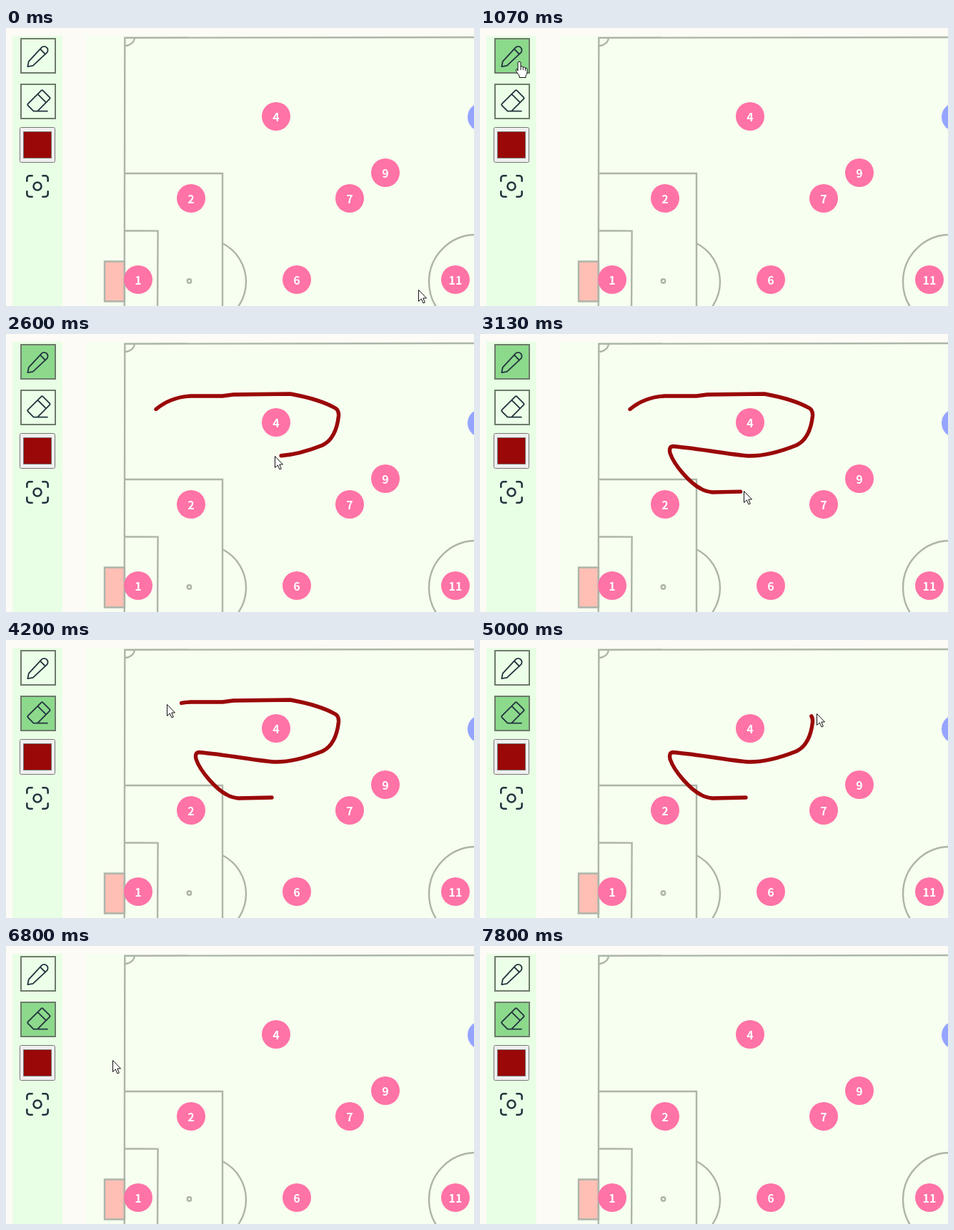
Write an HTML page that moves like this. It is 655 by 390 pixels and loops after 9670 ms.

```html
<!DOCTYPE html>
<html lang="en">
<head>
<meta charset="utf-8">
<title>Tactics board</title>
<style>
html, body { margin: 0; width: 100%; height: 100%; overflow: hidden; background: #fcfbf6; }
svg { display: block; fill: none; }
text { font: 700 16px "Noto Sans CJK JP", "Noto Sans CJK SC", "Noto Sans CJK", "Noto Sans", sans-serif; fill: #fff; text-anchor: middle; }
.lines { stroke: #adb5a9; stroke-width: 2.4; }
.button { stroke: #6c7b6a; stroke-width: 2; }
.icon { stroke: #23343f; stroke-linejoin: round; stroke-linecap: round; }
.cursor { fill: #fff; stroke: #111; stroke-linejoin: round; }
</style>
</head>
<body>
<svg width="655" height="390" viewBox="0 0 655 390">
  <path fill="#e9ffe5" d="M9 11h70v379H9z"/>
  <path fill="#f7fff0" d="M112 11h543v379H112z"/>

  <g class="lines">
    <path fill="#ffbfb5" d="M138 327.5h28v56h-28z"/>
    <path d="M165.7 400L166.3 13.7L660 13M180 13.5A14 12 0 0 1 166 25M166 204H303V400M166 284.3L212.6 284.6L212 400"/>
    <path d="M303 302A60.7 60.7 0 0 1 303 410"/>
    <circle cx="256.5" cy="355" r="2.7"/>
    <circle cx="658" cy="356" r="66"/>
  </g>
  <g id="players"></g>

  <rect id="pencil" class="button" x="21" y="15" width="48" height="48"/>
  <path class="icon" transform="translate(23 17.5) scale(1.833)"
    d="M4 20l.8-4L14.5 5.5a2.83 2.83 0 1 1 4 4L8 19.3zM13.5 6.5l4 4"/>
  <rect id="eraser" class="button" x="21" y="79" width="48" height="48"/>
  <path class="icon" transform="translate(23 80) scale(1.833)"
    d="M19 20H8.5l-4.2-4.3a1 1 0 0 1 0-1.4l10-10a1 1 0 0 1 1.4 0l5 5a1 1 0 0 1 0 1.4L11.5 20M18 13.3L11.7 7"/>
  <rect x="19.5" y="139.5" width="49" height="49" rx="2" fill="#efefef" stroke="#767676"/>
  <path fill="#9a0808" stroke="#777" d="M24.5 145.5h39v37h-39z"/>
  <path class="icon" stroke-width="1.4" transform="translate(22 200) scale(1.833)"
    d="M4 8V6a2 2 0 0 1 2-2h2M4 16v2a2 2 0 0 0 2 2h2M16 4h2a2 2 0 0 1 2 2v2M16 20h2a2 2 0 0 0 2-2v-2M9 12a3 3 0 1 0 6 0a3 3 0 1 0-6 0"/>

  <path id="stroke" stroke="#9a0808" stroke-width="5.4" stroke-linecap="round" stroke-linejoin="round"
    d="M210 105.5C225 93 240 88 258 87H303L318 85L398 84C420 88 445 95 461 104Q466 107 465.5 115C463 138 455 150 443 156C418 166 395 171 378 171S310 161 270 157.5Q264 158 266 167C272 185 295 210 309 217Q316 221 325 222L372 221"/>

  <path id="arrow" class="cursor" d="M.5 .5V16.5L4.3 13L7 19L9.3 18L6.8 12H11.5Z"/>
  <path id="hand" class="cursor" d="M-2 11V1.8A2 1.6 0 0 1 2 1.8V7Q4.5 6 5.3 8Q8 7 8.5 9Q11.5 8.5 11 11.5V15Q11 18 9 20V22.5H0V20L-4.5 13.5Q-5 10.5-3 10.5L-2 13ZM2 7v5M5.3 8v4M8.5 9v4"/>
</svg>
<script>
const $ = id => document.getElementById(id);
const LOOP = 9670, FPS = 15;
const DRAW = [1775, 3130], ERASE = [4057, 6350], LAG = 20;
const PENCIL_CLICK = 1066, ERASER_CLICK = 3600, LEAVE = 7790;
const stroke = $('stroke'), total = stroke.getTotalLength();

const players = [[4, 378, 124], [9, 531, 203], [7, 481, 239], [2, 259, 239],
  [1, 185, 353], [6, 407, 353], [11, 629, 353], ['', 666, 125]];
$('players').innerHTML = players.map(([n, x, y]) =>
  `<circle cx="${x}" cy="${y}" r="20" fill="${n ? '#ff73a6' : '#95a5ff'}"/><text x="${x}" y="${y + 7}">${n}</text>`).join('');

const progress = ([from, to], t) => Math.min(1, Math.max(0, (t - from) / (to - from)));

// Position on the stroke, widened sideways around its middle.
function onStroke(u, widen = 1) {
  const p = stroke.getPointAtLength(u * total);
  return [365 + (p.x - 365) * widen, p.y];
}
const drawAt = t => onStroke(progress(DRAW, t));
const eraseAt = t => onStroke(progress(ERASE, t - LAG), 1.12);

// Stops of the cursor between the two strokes.
const pencil = [55, 47], eraser = [45, 112];
const stops = [[0, [577, 367]], [800, pencil], [1200, pencil], [DRAW[0], drawAt(DRAW[0])],
  [DRAW[1], drawAt(DRAW[1])], [3530, eraser], [3730, eraser], [ERASE[0], eraseAt(ERASE[0])],
  [ERASE[1], eraseAt(ERASE[1])], [7000, [52, 133]], [7330, eraser], [7535, eraser], [7733, [183, 346]], [LOOP, [183, 346]]];

function cursorAt(t) {
  const during = ([from, to]) => t >= from && t < to;
  if (during(DRAW)) return drawAt(t);
  if (during(ERASE)) return eraseAt(t);
  const i = stops.findIndex(([time]) => time > t);
  const [t0, a] = stops[i - 1], [t1, b] = stops[i], u = progress([t0, t1], t);
  return a.map((v, j) => v + (b[j] - v) * u);
}

function show(id, visible) {
  $(id).style.display = visible ? '' : 'none';
}

function render(t) {
  const [x, y] = cursorAt(t).map(Math.round);
  const over = top => x >= 20 && x < 70 && y >= top && y < top + 50;
  const paint = (id, on, hover) => $(id).setAttribute('fill', on ? '#8cd98c' : hover ? '#bdf0bd' : '#ecffe8');
  const onPencil = over(14), onEraser = over(78);
  paint('pencil', t >= PENCIL_CLICK && t < ERASER_CLICK, onPencil);
  paint('eraser', t >= ERASER_CLICK, onEraser);

  const tail = progress(ERASE, t) * total, length = progress(DRAW, t - LAG) * total - tail;
  show('stroke', length > 1);
  stroke.setAttribute('stroke-dasharray', `${Math.max(length, 0)} 2000`);
  stroke.setAttribute('stroke-dashoffset', -tail);

  const hand = onPencil || onEraser;
  show('hand', hand && t < LEAVE);
  show('arrow', !hand && t < LEAVE);
  for (const id of ['hand', 'arrow']) $(id).setAttribute('transform', `translate(${x} ${y})`);
}

const start = performance.now();
function tick() {
  const t = (performance.now() - start) % LOOP;
  render(Math.floor((t + 4) * FPS / 1000) * 1000 / FPS);
  requestAnimationFrame(tick);
}
tick();
</script>
</body>
</html>
```
